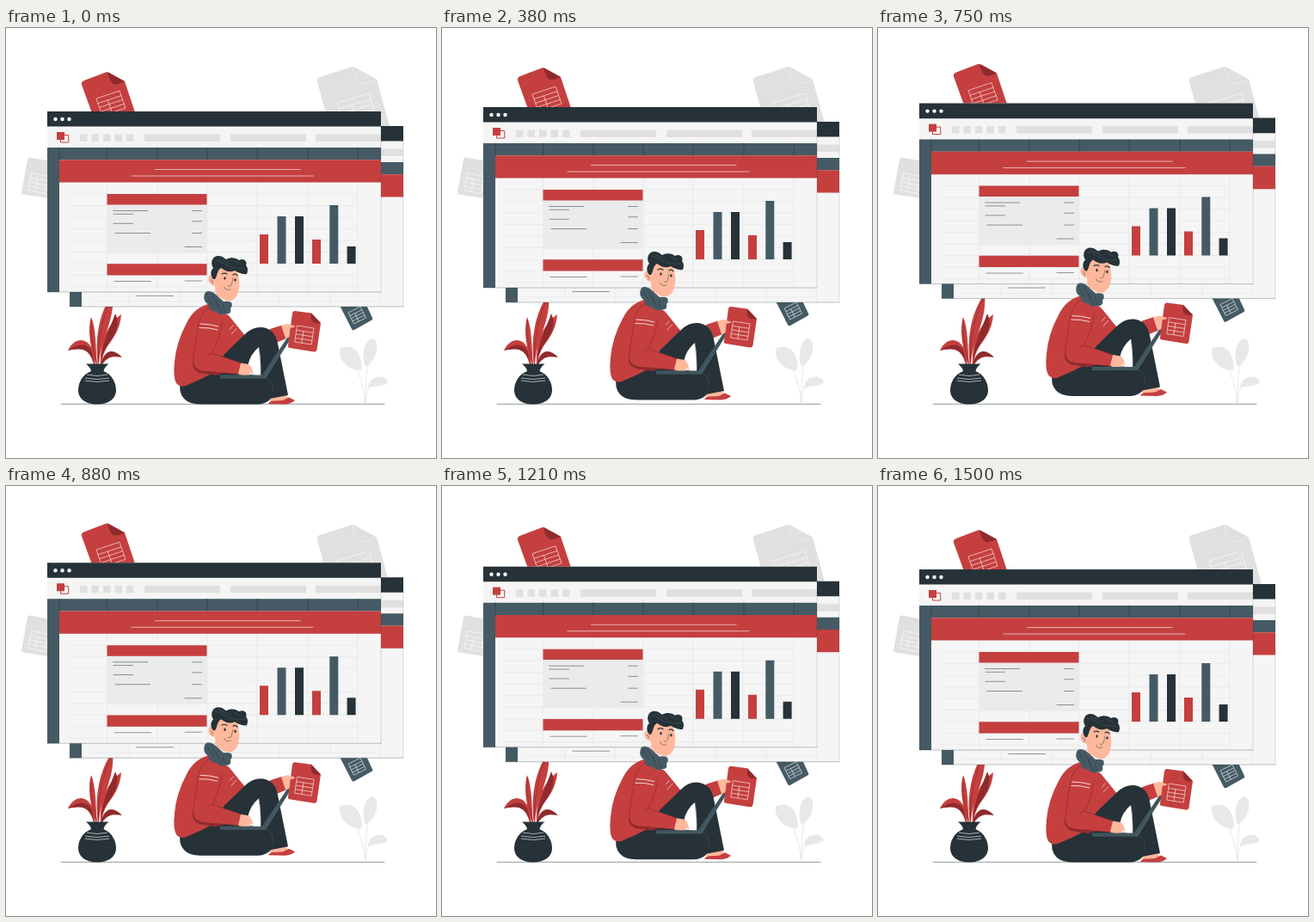
Animation of 500 by 500 pixels, one loop 1540 ms. Source, as an HTML page:

```html
<!DOCTYPE html>
<html lang="en">
<head>
<meta charset="utf-8">
<title>Spreadsheet desk</title>
<style>
html, body { margin: 0; height: 100%; overflow: hidden; background: #fff; }
svg { display: block; width: 100vw; height: 100vh; }
.red { fill: #c53f3f; }
.maroon { fill: #8f2b2d; }
.dark { fill: #263238; }
.slate { fill: #455a64; }
.pale { fill: #f5f5f5; }
.grey { fill: #e0e0e0; }
.skin { fill: #ffb89c; }
.line { fill: none; stroke: #263238; stroke-width: .5; stroke-linecap: round; }
.white { fill: none; stroke: #fff; stroke-width: .6; }
.seam { fill: none; stroke: #7d2225; stroke-width: .5; }
.leaf { fill: #e8e8e8; }
</style>
</head>
<body>
<svg viewBox="0 0 500 500">
  <defs>
    <path id="grid" class="white" d="M0 0H1V1H0ZM0 .28H1M0 .52H1M0 .76H1M.42 .28V1" vector-effect="non-scaling-stroke"/>
    <g id="window">
      <path class="pale" d="M48 97H436V307H48Z"/>
      <path class="dark" d="M48 97H436V114.6H48Z"/>
      <g fill="#fff"><circle cx="57.5" cy="106" r="2.2"/><circle cx="65.5" cy="106" r="2.2"/><circle cx="73.5" cy="106" r="2.2"/></g>
      <path class="red" d="M59 121H68V130H59Z"/>
      <path d="M63.5 124.5H72.7V133H63.5Z" fill="none" stroke="#c53f3f"/>
      <path class="grey" d="M86 123.5h8.5v8.5h-8.5zm13.5 0h8.5v8.5h-8.5zm13.5 0h8.5v8.5h-8.5zm13.5 0h8.5v8.5h-8.5zm13.5 0h8.5v8.5h-8.5zM161 123.5h88v8.5h-88zm100 0h88v8.5h-88zm99 0h76v8.5h-76z"/>
      <path class="slate" d="M48 139H436V153.2H62V307H48Z"/>
      <path class="line" d="M62 139v14M117.5 139v14M176 139v14M234 139v14M292 139v14M351 139v14M409 139v14"/>
      <path class="red" d="M62 153.2H436V179.6H62Z"/>
      <path class="white" d="M173 164.5H342.5M145.5 172H357.5"/>
      <path class="grid-lines" fill="none" stroke="#e6e6e6" stroke-width=".7"/>
      <path d="M117.5 205H233.5V262H117.5Z" fill="#ebebeb"/>
      <path class="red" d="M117.5 193H233.5V205.4H117.5ZM117.5 274.2H233.5V287.5H117.5Z"/>
      <path class="line" d="M124.5 212.5H164.5M125 216.3H147.5M125 227.3H147.5M127 238.5H167.5M217 212.5H227.5M217 224.7H227.5M217 238.5H227.5M208 254.5H227.5M126 294.5H168.5M208 294H227.5"/>
      <path class="line" d="M48 307H436" opacity=".6"/>
      <path class="line" d="M436 114V307" opacity=".3"/>
    </g>
  </defs>

  <path class="grey" d="M365 57 402 45.2Q404 44.7 406 46L431 59.5 447 118 378 120 362 63Q361 58 365 57ZM28 150.5 52 155V198.5L20 193.5Q17.5 193 18.2 190L25 153Q25.5 150.2 28 150.5Z"/>
  <path d="M403 45Q406 63 412 64 420 66 431 59.5" fill="none" stroke="#efefef" stroke-width=".7"/>
  <use href="#grid" transform="matrix(37 -11 8 25 385 87)"/>
  <use href="#grid" transform="matrix(20 4 -4 20 29.5 168.5)"/>
  <path class="line" d="M64 437.3H440"/>

  <g id="plants">
    <path class="red" d="M107 391C103 362 108 331 124 309C126 328 120 345 114 361Q109 376 108 391ZM105 391C97 370 95 350 99 336C105 350 104 371 106 391ZM102 391C97 371 86 372 72 375C80 359 94 360 100 373Q103 381 104 391ZM110 391C109 363 119 344 134 333C133 350 125 360 118 370Q112 380 111 391Z"/>
    <path class="maroon" d="M110 387C112 366 121 349 127 332L129 337C132 349 124 360 118 369Q112 378 110 387ZM110 391C115 372 126 373 135 383C124 381 118 382 112 391ZM102 391C97 371 86 372 72 375C84 366 95 366 100 377Z"/>
    <path class="seam" d="M107 389Q107 347 123 311M105 389Q98 361 99 339"/>
    <path class="dark" d="M93 390.5H119.5Q114 395 113.5 399C123 403 128 412 128 421C128 432 118 437.5 106 437.5C94 437.5 84 432 84 421C84 412 89 403 99 399Q98.5 395 93 390.5Z"/>
    <path class="white" d="M94 403Q106 406 118 403M92 407Q106 410 120 407M92 410Q106 413 120 410"/>
    <path d="M418 436Q416 416 407 394M418 436Q417 409 422 386M418 436Q418 421 425 415" fill="none" stroke="#e0e0e0" stroke-width=".7"/>
    <path class="leaf" d="M388 373C396 368 407 371 411 381Q415 389 413 398C401 399 386 388 388 373ZM418 394C413 383 416 363 426 361C436 364 432 386 418 394ZM421 419C421 410 429 404 437 406Q442 407 444 412C438 418 430 415 421 419Z"/>
  </g>

  <g id="floating">
    <path class="red" d="M91 61 116 51.5Q118 51 120 52L138 62 154 110H104L88 66Q87 62.5 91 61Z"/>
    <path class="maroon" d="M118 51.2 138 62Q130 66 125 65 120 62 118 51.2Z"/>
    <use href="#grid" transform="matrix(27 -9 7 20 105 82)"/>
    <path class="slate" d="M380 307 402 350Q403 352 405 351L425.5 339.5Q427 338.5 426 337L412 307Z"/>
    <use href="#grid" transform="matrix(14 -7 6.5 13 398 331)"/>
    <use href="#window" x="26" y="17"/>
    <use href="#window"/>
    <path class="red" d="M295 240h10v34h-10zM356 246h10v28h-10z"/>
    <path class="slate" d="M315.5 219h10v55h-10zM376.3 206h10v68h-10z"/>
    <path class="dark" d="M336 219h10v55h-10zM396.6 254h10v20h-10z"/>

    <g id="person">
      <path class="red" d="M253 332Q258 332 262 338L279 359 284 384 252 380 246 350ZM307 350 321 345.5Q325 354 326 361L307 369Z"/>
      <path class="white" d="M253.5 358 264.5 345.5M257 361.5 268 349.5"/>
      <path class="skin" d="M306 428 325 426 328 431 333 433 308 437Z"/>
      <path class="red" d="M305 437Q307 433 313 433.5L322 433 329 429.5 336 433Q332 437 324 437.5Z"/>
      <path class="dark" d="M250 383 278 356Q287 347 298 348 313 350 316 367L328 427 307 431 296 407Q297 385 294 371 284 379 281 393L262 400Z"/>
      <path class="dark" d="M203 412Q200 423 207 431 213 437.5 226 437.5H292C304 437.5 311 431 311 420Q311 406 298 405L250 398Z"/>
      <path d="M294 371Q296 391 297 405M301 406Q312 409 310 423" fill="none" stroke="#56656d" stroke-width=".4"/>
      <path class="red" d="M239 320Q219 324 210 343 198 365 196 388 194 406 198 413 202 418 209 416 226 409 243 400L246 390 254 378 262 356 255 333Z"/>
      <path class="maroon" d="M219 382Q213 396 225 401L244 404 258 400 225 394Z"/>
      <path class="red" d="M242 324Q229 324 224 343L218 382Q215 397 229 399L270 402.5 273.5 389.5 240 378Q250 356 251 342 252 327 242 324Z"/>
      <path class="seam" d="M242 324Q229 324 224 343L218 382Q215 397 229 399L270 402.5M251 342Q250 358 240 378L273 389.5M240 378 234 381"/>
      <path class="white" style="stroke-width:.8" d="M225.5 344Q237 344 247 347M224.5 348.5Q236 348 246 351"/>

      <path class="slate" d="M231 309C233 304 239 306 243 309L253 318Q258 317 262 319 264 323 261 326 263 333 255 332.500 249 335 245 330 236 330 235.500 322 228 317 231 309Z"/>
      <path class="line" d="M234 309Q236 317 242 323M239 309Q242 317 248 324M245 317Q246 326 251 331M253 321Q252 328 256 332"/>
      <path class="skin" d="M241 282Q255 272 269 281C270 287 272 296 271 301Q270 314 262 317C255 318 248 314 243.500 308L243 300C237 299 234 294 236 289Q238 286 241 289Z"/>
      <path class="dark" d="M241 292C237 287 238 282 241 279C237 273 240 265 247 265C252 265 254 268 256 269C261 266 268 267 271 270C277 267 281 272 279 276C282 279 281 284 280 286C274 287 270 284 266 282C260 285 254 282 250 279C245 282 246 288 243 292Z"/>
      <path d="M243 270Q250 270 255 275 262 280 278 279M247 268Q256 271 262 275M265 271 274 275" fill="none" stroke="#5c6b73" stroke-width=".4"/>
      <path class="line" d="M264 291 262 299Q260 302 258 300M253.5 301Q255 306 261 304M238 293Q241 292 240 297"/>
      <path class="line" style="stroke-width:1.2" d="M251 286Q254 284 257 286M264 287Q267 285 269 288"/>
      <g class="dark"><ellipse cx="254.5" cy="291" rx="1.2" ry="1.8"/><ellipse cx="266.5" cy="293" rx="1.2" ry="1.8"/></g>

      <path class="skin" d="M273 389.5 282 391Q287 394 287 403L284 400 283 405H278L270 402.5Z"/>
      <path class="slate" d="M249 403.5H298L327 360 331 359 330 363 302 407.5H249Z"/>
      <path class="line" d="M249 405.5H299L329 361" opacity=".6"/>
      <path class="skin" d="M320 346 327 344 335 346 334 352 331 359 325 361Z"/>
      <path class="red" d="M336 329 355 331.5 366 343 361.5 374Q361 377 358 376.5L330 372Q327.5 371.5 328 369L333 331.5Q333.5 328.7 336 329Z"/>
      <path class="maroon" d="M355 331.5 366 343.5Q358 344 356 341 354 338 355 331.5Z"/>
      <use href="#grid" transform="matrix(19.5 3 -2.8 19 338.5 346)"/>
      <path class="skin" d="M322 346Q327 343 336 346.5 337 348.5 329 348.5L330 357 325 356Z"/>
    </g>
  </g>
</svg>
<script>
const LOOP = 1540, FPS = 24, STEPS = 36, HEIGHT = 10, REST = .3;
const floating = document.getElementById("floating");

const columns = [117.5, 176, 234, 292, 351, 409].map(x => `M${x} 180V307`);
const rows = Array.from({ length: 9 }, (_, i) => `M72 ${193 + i * 13.5}H409`);
document.querySelector(".grid-lines").setAttribute("d", columns.concat(rows).join(""));

// The float is sampled at the middle of each 1/24 s step; the small bias absorbs time rounding.
function draw() {
  const step = Math.floor(performance.now() % LOOP * FPS / 1000 + .15);
  const phase = (step + .5) / STEPS % 1;
  const y = REST - HEIGHT * (1 - Math.abs(2 * phase - 1));
  floating.setAttribute("transform", `translate(0 ${y})`);
  requestAnimationFrame(draw);
}
draw();
</script>
</body>
</html>
```
